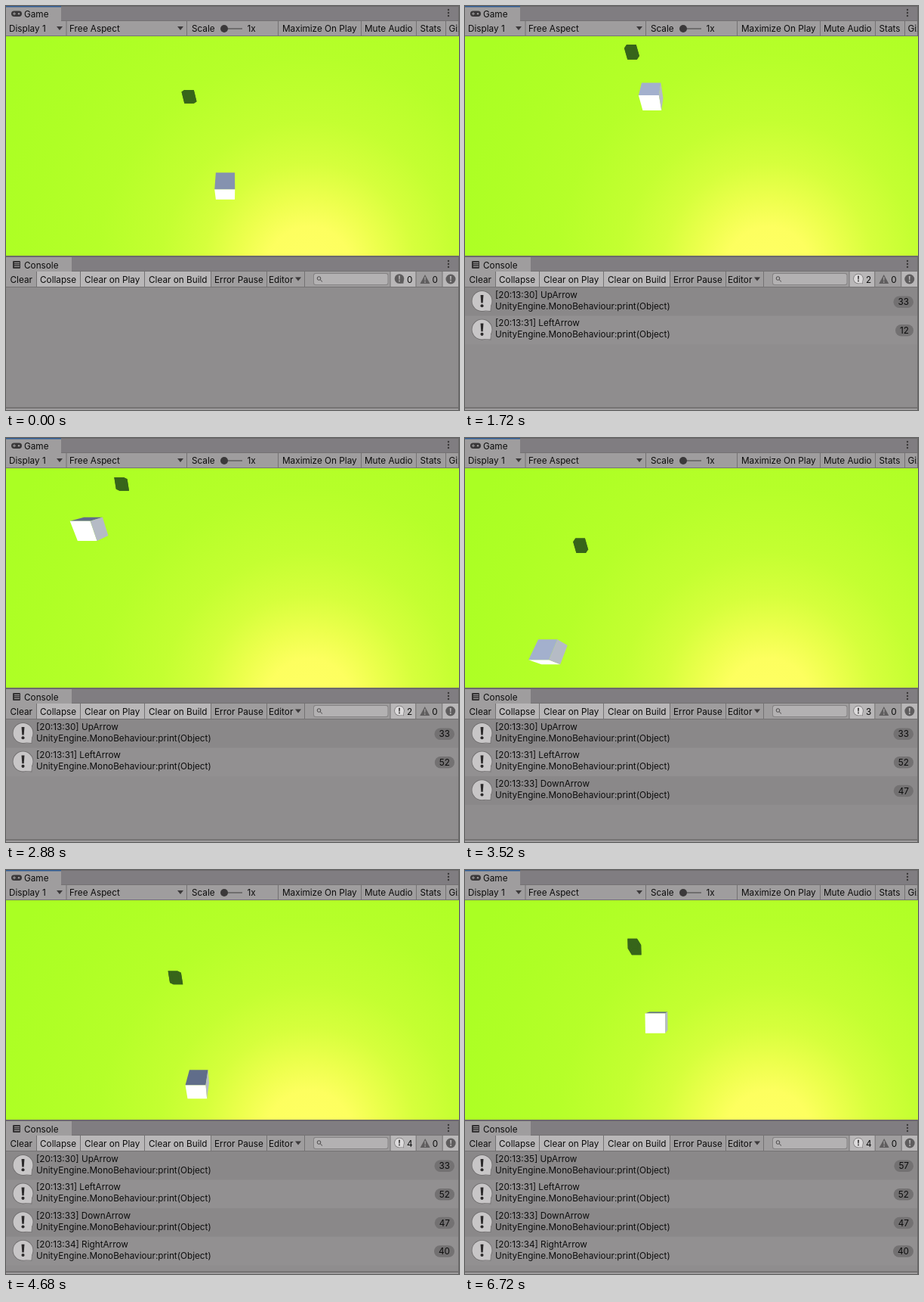
Animation of 600 by 534 pixels, one loop 6.76 s. Source, as an HTML page with a canvas:

```html
<!DOCTYPE html>
<html lang="en">
<head>
<meta charset="utf-8">
<title>Rolling cube with key log</title>
<style>
  html, body { margin: 0; width: 100%; height: 100%; overflow: hidden; background: #8f8d8e; }
  canvas { display: block; }
</style>
</head>
<body>
<canvas id="stage" width="600" height="534"></canvas>
<script>
const ctx = document.getElementById('stage').getContext('2d');
const LOOP = 6760, STEP = 40;
const INK = '#0c0c0c', BAR = '#9f9d9e', STRIP = '#807d81', LINE = '#747273', LIT = '#b9b7b8', DIM = '#5f5d5e';

// ---- drawing helpers ----
function rect(x, y, w, h, color) {
  ctx.fillStyle = color;
  ctx.fillRect(x, y, w, h);
}
function poly(points, color) {
  ctx.fillStyle = color;
  ctx.beginPath();
  points.forEach(p => ctx.lineTo(p[0], p[1]));
  ctx.closePath();
  ctx.fill();
}
function disc(x, y, r, color) {
  ctx.fillStyle = color;
  ctx.beginPath();
  ctx.arc(x, y, r, 0, 7);
  ctx.fill();
}
function pill(x, y, w, h, r, color) {
  ctx.fillStyle = color;
  ctx.beginPath();
  ctx.roundRect(x, y, w, h, r);
  ctx.fill();
}
function text(s, x, y, size = 11.75) {
  ctx.font = `${size}px Inter, sans-serif`;
  ctx.fillStyle = INK;
  ctx.fillText(s, x, y);
}
const arrow = (x, y) => poly([[x - 4, y - 2.5], [x + 4, y - 2.5], [x, y + 2.5]], '#3c3a3b');
const dividers = (xs, y, h) => xs.forEach(x => rect(x - 0.5, y, 1, h, LINE));
const kebab = y => [-4, 0, 4].forEach(d => disc(586, y + d, 1.2, '#3a3839'));

function bang(x, y, r, color) {
  const w = r * 0.15;
  poly([[x - w, y - r * 0.62], [x + w, y - r * 0.62], [x + w * 0.6, y + r * 0.2], [x - w * 0.6, y + r * 0.2]], color);
  disc(x, y + r * 0.48, w * 1.05, color);
}
function bubble(x, y, r, color, mark, edge) {
  const tail = d => [[x + r * 0.9, y + r * 0.3], [x + r * 0.85 + d, y + r + d], [x, y + r * 0.95]];
  if (edge) {
    disc(x, y, r + 0.8, edge);
    poly(tail(0.8), edge);
  }
  disc(x, y, r, color);
  poly(tail(0), color);
  bang(x, y, r, mark);
}

// ---- timeline: speed is ten units a second ----
const start = { x: -0.38, y: -2.11 };
const moves = [
  { key: 'Up',    at: 555,  ms: 470, y: 4.7,   hits: 33, lag: 145, clock: 30 },
  { key: 'Left',  at: 1548, ms: 712, x: -7.12, hits: 52, clock: 31 },
  { key: 'Down',  at: 2882, ms: 632, y: -6.49, hits: 47, clock: 33 },
  { key: 'Right', at: 4100, ms: 572, x: 5.68,  hits: 40, clock: 34 },
  { key: 'Up',    at: 5300, ms: 326, y: 3.26,  hits: 24, clock: 35 }
];
function stateAt(t) {
  const s = { ...start, rows: [] };
  for (const m of moves) {
    const k = Math.min(1, Math.max(0, (t - m.at) / m.ms));
    s.x += (m.x || 0) * k;
    s.y += (m.y || 0) * k;
    if (t < m.at + (m.lag || 0)) continue;
    let row = s.rows.find(r => r.key === m.key);
    if (!row) s.rows.push(row = { key: m.key, count: 0 });
    row.count += Math.max(1, Math.floor(k * m.hits));
    row.clock = m.clock;
  }
  return s;
}

// ---- 3D scene: camera ten units in front of the cube, wall ten units behind ----
const FOCAL = 251, CAM = 10, WALL = 10;
const slope = { x: -0.42, y: 0.73 };
const project = ([x, y, z]) => [300 + FOCAL * x / (CAM + z), 185 - FOCAL * y / (CAM + z)];
const cast = ([x, y, z]) => [x + slope.x * (WALL - z), y + slope.y * (WALL - z), WALL];

function faceColor(base, light) {
  return `rgb(${base.map(c => Math.min(255, c + 235 * Math.max(0, light)))})`;
}
function cubeFaces(cx, cy, tilt) {
  const ring = [0, 1, 2, 3].map(i => {
    const a = tilt + Math.PI / 4 + i * Math.PI / 2;
    return [Math.SQRT1_2 * Math.sin(a), -Math.SQRT1_2 * Math.cos(a)];
  });
  const at = (side, i) => [cx + side, cy + ring[i % 4][0], ring[i % 4][1]];
  const faces = [0, 1, 2, 3].map(i => {
    const e = tilt + (i + 1) * Math.PI / 2;
    const light = -0.557 * Math.sin(e) + 0.763 * Math.cos(e);
    return {
      corners: [at(-0.5, i), at(-0.5, i + 1), at(0.5, i + 1), at(0.5, i)],
      color: faceColor([96, 109, 138], light)
    };
  });
  faces.push({ corners: [0, 1, 2, 3].map(i => at(0.5, i)), color: faceColor([106, 112, 122], 0.32) });
  faces.push({ corners: [3, 2, 1, 0].map(i => at(-0.5, i)), color: faceColor([106, 112, 122], 0) });
  return faces;
}
function facesCamera(p) {
  let area = 0;
  p.forEach(([x, y], i) => {
    const [u, v] = p[(i + 1) % p.length];
    area += x * v - u * y;
  });
  return area > 0;
}

const glow = ctx.createRadialGradient(402, 348, 0, 402, 348, 470);
[[0, 255, 100], [0.12, 253, 95], [0.2, 237, 77], [0.3, 214, 60], [0.42, 196, 49],
 [0.6, 182, 41], [0.8, 175, 37], [1, 170, 35]]
  .forEach(([k, r, b]) => glow.addColorStop(k, `rgb(${r},255,${b})`));

function drawScene(s, t) {
  ctx.save();
  ctx.beginPath();
  ctx.rect(0, 40, 600, 290);
  ctx.clip();
  rect(0, 40, 600, 290, glow);
  const faces = cubeFaces(s.x, s.y, (44.2 + t / 10) * Math.PI / 180);
  faces.forEach(f => poly(f.corners.map(c => project(cast(c))), '#37651a'));
  for (const f of faces) {
    const p = f.corners.map(project);
    if (facesCamera(p)) poly(p, f.color);
  }
  ctx.restore();
}

// ---- editor panels ----
function drawGameBar() {
  rect(0, 0, 600, 20, STRIP);
  rect(0, 0, 600, 1, '#6c6a6b');
  rect(0, 0, 73, 20, BAR);
  rect(0, 0, 73, 1.5, '#2f5c94');
  rect(73, 19, 527, 1, LINE);
  rect(0, 20, 600, 20, BAR);
  rect(0, 39, 600, 1, LINE);
  pill(7, 6.5, 14, 7.5, 3.7, '#3a3839');
  rect(9, 9.7, 4, 1, BAR);
  rect(10.5, 8.2, 1, 4, BAR);
  disc(17, 10.2, 1.2, BAR);
  text('Game', 24, 14.5);
  kebab(9);
  dividers([80, 239.5, 360.5, 470.5, 543.5, 582.5], 20, 19);
  [['Display 1', 4], ['Free Aspect', 84], ['Scale', 246], ['1x', 319.5], ['Maximize On Play', 366],
   ['Mute Audio', 475], ['Stats', 548.5], ['Gizmos', 586.5]].forEach(([s, x]) => text(s, x, 34));
  arrow(71, 29.5);
  arrow(231, 29.5);
  rect(289, 29.3, 24, 1.4, '#5c5a5b');
  disc(289, 30, 5, '#3b393a');
}

function drawConsoleBar(rows) {
  rect(0, 330, 600, 2, '#6c6a6b');
  rect(0, 332, 600, 19, STRIP);
  rect(0, 332, 87, 19, BAR);
  rect(87, 350, 513, 1, LINE);
  rect(0, 351, 600, 20, BAR);
  pill(9, 337, 10, 10, 1, '#333132');
  [339, 341.5, 344].forEach(y => rect(11, y, 7, 1, BAR));
  text('Console', 24, 346.5);
  kebab(341);

  [[41, 57], [99, 84], [184, 87]].forEach(([x, w]) => rect(x, 351, w, 20, LIT));
  dividers([40.5, 98.5, 183.5, 271.5, 345.5, 395.5], 351, 20);
  [['Clear', 5.5], ['Collapse', 45], ['Clear on Play', 104], ['Clear on Build', 189],
   ['Error Pause', 276], ['Editor', 348]].forEach(([s, x]) => text(s, x, 365.5));
  arrow(387, 361);

  pill(407, 353, 99.5, 16, 3, '#858384');
  pill(408, 354, 97.5, 14, 2.5, '#b3b1b2');
  ctx.strokeStyle = '#4a4849';
  ctx.lineWidth = 1;
  ctx.beginPath();
  ctx.arc(414.5, 360, 2.3, 0, 7);
  ctx.moveTo(416.2, 361.8);
  ctx.lineTo(419, 364.5);
  ctx.stroke();

  const n = String(rows.length);
  ctx.font = '11.75px Inter, sans-serif';
  const dx = ctx.measureText(n).width - ctx.measureText('0').width;
  rect(509, 351, 34 + dx, 20, LIT);
  rect(578 + dx, 351, 22, 20, LIT);
  dividers([509, 543 + dx, 578 + dx], 351, 20);
  if (rows.length) bubble(521, 360.5, 6, '#dddbdc', '#2a2829', '#7a7879');
  else bubble(521, 360.5, 6.3, DIM, LIT);
  text(n, 531, 365.5);
  poly([[548.5 + dx, 367], [555 + dx, 355], [561.5 + dx, 367]], DIM);
  bang(555 + dx, 362, 6, BAR);
  text('0', 564.5 + dx, 365.5);
  disc(589 + dx, 361, 6.5, DIM);
  bang(589 + dx, 361, 6.5, LIT);
  text('0', 599 + dx, 365.5);
  rect(0, 371, 600, 1, LINE);
}

function drawLog(rows) {
  rect(0, 372, 600, 159, '#8f8d8e');
  rows.forEach((row, i) => {
    const y = 372 + i * 37.6;
    rect(0, y, 600, 37.6, i % 2 ? '#929091' : '#8a8889');
    bubble(22.5, y + 18, 13, '#c8c6c7', '#2b292a', '#6b696a');
    text(`[20:13:${row.clock}] ${row.key}Arrow`, 40, y + 13.8);
    text('UnityEngine.MonoBehaviour:print(Object)', 40, y + 28.8);
    const w = ctx.measureText(row.count).width;
    pill(582 - w, y + 11.5, w + 12, 15.5, 7.7, '#737172');
    text(row.count, 588 - w, y + 23.4);
  });
  rect(0, 530.5, 600, 1.5, '#6c6a6b');
  rect(0, 532, 600, 2, BAR);
}

function frame() {
  const t = Math.floor(performance.now() % LOOP / STEP) * STEP;
  const s = stateAt(t);
  drawGameBar();
  drawLog(s.rows);
  drawConsoleBar(s.rows);
  rect(599, 0, 1, 534, '#6c6a6b');
  drawScene(s, t);
  requestAnimationFrame(frame);
}
frame();
</script>
</body>
</html>
```
